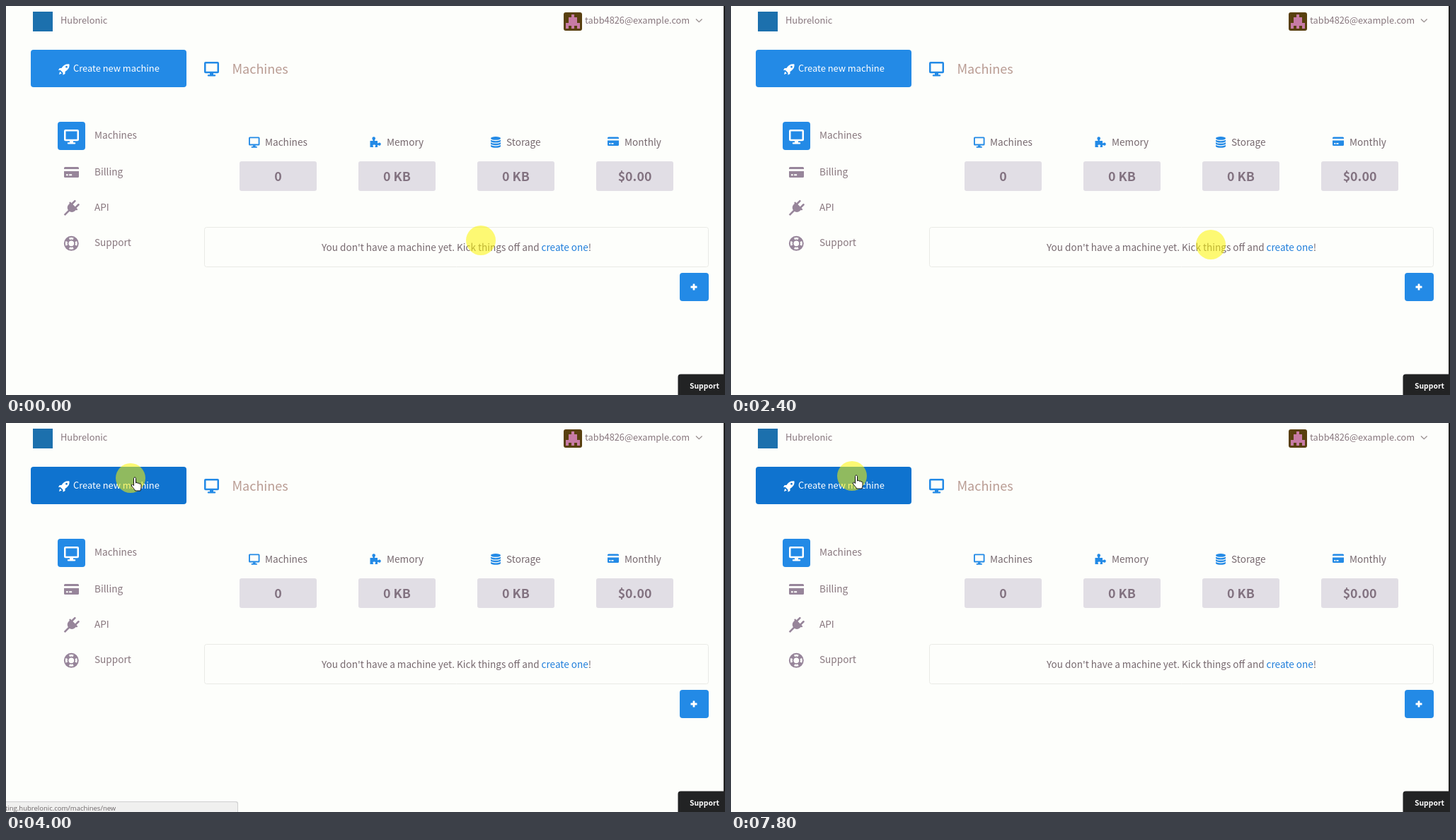
Animation, 1016 px wide and 551 px high, one loop 8000 ms. Source, as an HTML page with a canvas:

```html
<!DOCTYPE html>
<html lang="en">
<head>
<meta charset="utf-8">
<title>Machines</title>
<style>
html, body { margin: 0; width: 100%; height: 100%; overflow: hidden; background: #fdfefb; }
canvas { display: block; width: 1016px; height: 551px; }
</style>
</head>
<body>
<canvas id="stage" width="1016" height="551"></canvas>
<script>
const ctx = document.getElementById('stage').getContext('2d');
const LOOP = 8000, STEP = 200;
const BG = '#fdfefb', BLUE = '#238ae6', MAUVE = '#97859a', LABEL = '#88777e', DARK = '#76686e';
const SANS = '"Noto Sans CJK JP", "Noto Sans CJK SC", "Noto Sans CJK", sans-serif';

// pointer path: time, x, y
const PATH = [
  [0, 671, 332], [200, 674, 335], [400, 677, 337], [600, 678, 338], [2400, 678, 338],
  [2600, 640, 302], [2800, 560, 236], [3000, 472, 182], [3200, 402, 144], [3400, 272, 61],
  [3600, 215, 66], [3800, 183, 76], [4000, 176, 78], [4600, 174, 77], [4800, 171, 75]
];
const ROCKET = new Path2D('M15 .3C10 0 7 2 4.5 6H1.7L0 9h3l3.5 3.5v3.2l3-1.7v-3C13.5 8.5 16 5.5 15.5.8ZM11.5 2.8a1.4 1.4 0 1 0 .01 0ZM2.2 10.8l2.6 2.6L1 15Z');
const PUZZLE = new Path2D('M.5 6H4.6C4.6 4.5 3.4 4 3.4 2.5a2.3 2.3 0 0 1 4.6 0C8 4 6.8 4.5 6.8 6H11v3.4c1.3 0 1.6-1 2.6-1a1.8 1.8 0 0 1 0 4.4c-1 0-1.3-1-2.6-1V15H7.4c0-1 .8-1.3.8-2.2a1.9 1.4 0 0 0-3.8 0c0 .9.8 1.2.8 2.2H.5Z');
const ARROW = new Path2D('M0 0v13.5l3.2-3 2.2 5.2 2.2-1-2.2-4.9H10Z');
const HAND = new Path2D('M4.5.5c0-2 3-2 3 0V7c.4-1 2.6-1 2.8.6.6-.8 2.4-.6 2.5.8.8-.6 2.2-.2 2.2 1.2V14c0 1.5-1 2.5-1 4H6.5c0-1.5-4.2-5-5-7-.8-1.6.8-2.6 2-1.5l1 1.2Z');

function box(x, y, w, h, color, r = 0) {
  ctx.fillStyle = color;
  ctx.beginPath();
  ctx.roundRect(x, y, w, h, r);
  ctx.fill();
}

function text(str, x, y, size, color, { weight = 400, align = 'left', family = SANS } = {}) {
  ctx.font = `${weight} ${size}px ${family}`;
  ctx.textAlign = align;
  ctx.fillStyle = color;
  ctx.fillText(str, x, y);
  return x + ctx.measureText(str).width;
}

function at(x, y, draw) {
  ctx.save();
  ctx.translate(x, y);
  draw();
  ctx.restore();
}

function shape(path, x, y, color, outline) {
  at(x, y, () => {
    ctx.fillStyle = color;
    ctx.fill(path, 'evenodd');
    if (outline) {
      ctx.strokeStyle = outline;
      ctx.lineWidth = 1;
      ctx.stroke(path);
    }
  });
}

function monitor(x, y, w, color) {
  const u = w / 21;
  ctx.strokeStyle = color;
  ctx.lineWidth = 2.5 * u;
  ctx.beginPath();
  ctx.roundRect(x + 1.25 * u, y + 1.25 * u, w - 2.5 * u, 13.7 * u, 0.8 * u);
  ctx.stroke();
  box(x + 8 * u, y + 16 * u, 5 * u, 3 * u, color);
  box(x + 4.8 * u, y + 18.2 * u, 11.4 * u, 2.3 * u, color, u);
}

function card(x, y, w, h, color) {
  box(x, y, w, h, color, 1.5);
  box(x, y + h * 0.2, w, h * 0.2, BG);
  box(x + w * 0.14, y + h * 0.68, w * 0.13, h * 0.14, BG);
  box(x + w * 0.34, y + h * 0.68, w * 0.19, h * 0.14, BG);
}

function disks(x, y) {
  let d = 'M0 2.2a7 2.2 0 0 1 14 0v.4a7 2.2 0 0 1-14 0Z';
  for (let i = 0; i < 3; i++) d += `M0 ${4.2 + 3.6 * i}a7 2 0 0 0 14 0v2.4a7 2 0 0 1-14 0Z`;
  shape(new Path2D(d), x, y, BLUE);
}

function plug(x, y) {
  at(x, y, () => {
    ctx.rotate(Math.PI / 4);
    box(-4.9, -12.2, 2.6, 7.5, MAUVE, 1.2);
    box(2.3, -12.2, 2.6, 7.5, MAUVE, 1.2);
    box(-7.8, -5.5, 15.6, 2.4, MAUVE, 1);
    box(-6.3, -4, 12.6, 9, MAUVE, [0, 0, 6, 6]);
    box(-1.3, 4, 2.6, 9.5, MAUVE);
  });
}

function ring(r, width, from = 0, to = 2 * Math.PI) {
  ctx.lineWidth = width;
  ctx.beginPath();
  ctx.arc(0, 0, r, from, to);
  ctx.stroke();
}

function lifebuoy(x, y) {
  at(x, y, () => {
    ctx.strokeStyle = MAUVE;
    ring(9.5, 1.9);
    ring(4.8, 1.8);
    for (let i = 0; i < 4; i++) {
      const mid = Math.PI * (0.25 + i / 2);
      ring(7.2, 5.4, mid - 0.38, mid + 0.38);
    }
  });
}

function avatar(x, y) {
  box(x, y, 26, 26, '#59400f', 3);
  ['..X..', '.XXX.', '.XXX.', 'XXXXX', 'X.X.X'].forEach((row, j) => {
    [...row].forEach((c, i) => {
      if (c === 'X') box(x + 3 + i * 4, y + 3 + j * 4, 4, 4, '#c77ba5');
    });
  });
}

function header() {
  box(38, 8, 28, 28, '#1c70ad');
  text('Hubrelonic', 77, 25, 12.85, LABEL);
  avatar(788, 9);
  text('tabb4826@example.com', 818, 25, 12.8, LABEL);
  ctx.strokeStyle = '#99908f';
  ctx.lineWidth = 1.3;
  ctx.beginPath();
  ctx.moveTo(975, 18.5);
  ctx.lineTo(979.3, 22.7);
  ctx.lineTo(983.6, 18.5);
  ctx.stroke();
}

function sidebar(hover) {
  box(35, 62, 220, 53, hover ? '#0f73cf' : BLUE, 4);
  shape(ROCKET, 74, 82, '#fff');
  text('Create new machine', 95, 93, 12.85, '#fff', { weight: 500 });
  box(73, 164, 39, 40, BLUE, 4);
  monitor(82, 175, 21, '#fff');
  card(82, 228, 21, 15, MAUVE);
  plug(92.2, 286.5);
  lifebuoy(92.3, 336.3);
  [['Machines', 188], ['Billing', 240], ['API', 290], ['Support', 339.5]]
    .forEach(([name, y]) => text(name, 125, y, 13.6, LABEL));
}

function stats() {
  monitor(343, 185.5, 15.5, BLUE);
  shape(PUZZLE, 514, 185, BLUE);
  disks(685, 185);
  card(850, 185.5, 16, 12.5, BLUE);
  [['Machines', 366, '0'], ['Memory', 538, '0 KB'], ['Storage', 707, '0 KB'], ['Monthly', 874, '$0.00']]
    .forEach(([name, x, value], i) => {
      const left = 330 + 168 * i;
      text(name, x, 198, 13.6, DARK);
      box(left, 220, 109, 42, '#e1dee5', 3);
      text(value, left + 54.5, 247.7, 17.8, '#827280', { weight: 700, align: 'center' });
    });
}

function content() {
  monitor(280, 79, 21, BLUE);
  text('Machines', 319.5, 95.5, 18, '#b99c93');
  stats();
  ctx.strokeStyle = '#e9eae6';
  ctx.lineWidth = 1;
  ctx.beginPath();
  ctx.roundRect(280.5, 313.5, 712, 56, 3);
  ctx.stroke();
  let x = text("You don't have a machine yet. Kick things off and ", 446, 346.8, 13.55, DARK);
  x = text('create one', x, 346.8, 13.55, '#1f7edb');
  text('!', x, 346.8, 13.55, DARK);
  box(952, 378, 41, 40, BLUE, 4);
  box(967.5, 396.6, 9, 2.8, '#fff', 0.5);
  box(970.6, 393.5, 2.8, 9, '#fff', 0.5);
  box(1014, 0, 2, 551, '#222');
  box(949.5, 521.5, 67, 30, '#222324', [4, 0, 0, 0]);
  text('Support', 966, 542, 10.4, '#fff', { weight: 600 });
}

function statusBar(alpha) {
  if (!alpha) return;
  ctx.globalAlpha = alpha;
  box(-5, 536, 333, 20, '#cfcfd0', [0, 3, 0, 0]);
  box(-5, 537, 332, 20, '#f0f0ef', [0, 3, 0, 0]);
  text('ting.hubrelonic.com/machines/new', -1, 549.3, 9.5, '#6b6668', { family: '"Open Sans", sans-serif' });
  ctx.globalAlpha = 1;
}

function pointerAt(t) {
  const i = PATH.findIndex(p => p[0] > t);
  if (i < 0) return PATH[PATH.length - 1].slice(1);
  const [t0, x0, y0] = PATH[i - 1], [t1, x1, y1] = PATH[i];
  const k = (t - t0) / (t1 - t0);
  return [x0 + (x1 - x0) * k, y0 + (y1 - y0) * k];
}

function pointer(t, x, y, hover) {
  ctx.fillStyle = 'rgba(253, 246, 0, 0.54)';
  ctx.beginPath();
  ctx.arc(x, y, 21, 0, 2 * Math.PI);
  ctx.fill();
  if (hover) shape(HAND, x, y, '#fff', '#111');
  else if (t >= 2600) shape(ARROW, x, y, '#fff', '#111');
}

function statusAlpha(t) {
  if (t < 3600 || t >= 5200) return 0;
  return t < 3800 || t >= 5000 ? 0.5 : 1;
}

function frame(now) {
  const t = Math.floor((now % LOOP) / STEP) * STEP;
  const [x, y] = pointerAt(t);
  const hover = x < 255 && y > 61 && y < 115;
  box(0, 0, 1016, 551, BG);
  header();
  sidebar(hover);
  content();
  statusBar(statusAlpha(t));
  pointer(t, x, y, hover);
}

const start = performance.now();
function tick() {
  frame(performance.now() - start);
  requestAnimationFrame(tick);
}
tick();
</script>
</body>
</html>
```
